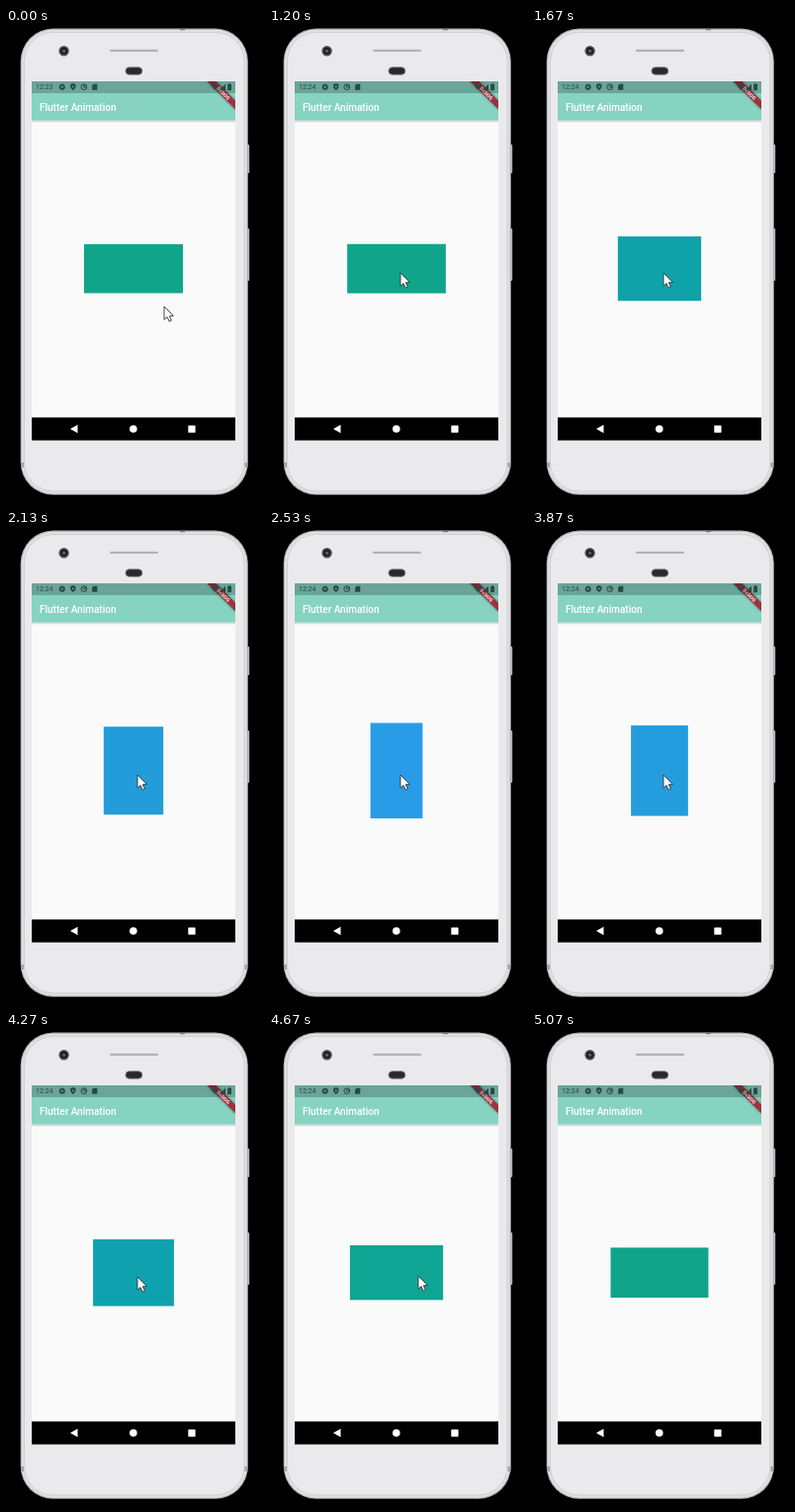
Recreate the animation shown at these times as an HTML page with a canvas. Size 260x480 px, loop 5140 ms.

```html
<!DOCTYPE html>
<html lang="en">
<head>
<meta charset="utf-8">
<title>Flutter Animation</title>
<style>
  html, body { margin: 0; width: 100%; height: 100%; overflow: hidden; background: #000; }
  canvas { display: block; width: 260px; height: 480px; }
</style>
</head>
<body>
<canvas id="stage" width="260" height="480"></canvas>
<script>
const ctx = document.getElementById('stage').getContext('2d');
const LOOP = 5140, STEP = 1000 / 15, DURATION = 2000;
const GREEN = [16, 165, 137], TEAL = [15, 162, 174], BLUE = [43, 155, 237];
const TEAL_AT = 0.36;
const INK = '#2c4842';

const clamp = v => Math.min(1, Math.max(0, v));
const mix = (a, b, p) => a + (b - a) * p;

// cubic-bezier(0.4, 0, 0.2, 1)
function fastOutSlowIn(t) {
  if (t <= 0 || t >= 1) return clamp(t);
  let lo = 0, hi = 1, s;
  for (let i = 0; i < 24; i++) {
    s = (lo + hi) / 2;
    const r = 1 - s;
    if (1.2 * s * r * r + 0.6 * s * s * r + s * s * s < t) lo = s; else hi = s;
  }
  return s * s * (3 - 2 * s);
}

function box(x, y, w, h, fill) {
  ctx.fillStyle = fill;
  ctx.fillRect(x, y, w, h);
}

function round(x, y, w, h, r, fill, stroke) {
  ctx.beginPath();
  ctx.roundRect(x, y, w, h, r);
  paint(fill, stroke);
}

function disc(x, y, r, fill, stroke) {
  ctx.beginPath();
  ctx.arc(x, y, r, 0, Math.PI * 2);
  paint(fill, stroke);
}

function poly(points, fill, stroke) {
  ctx.beginPath();
  points.forEach(([x, y]) => ctx.lineTo(x, y));
  ctx.closePath();
  paint(fill, stroke);
}

function paint(fill, stroke) {
  if (fill) { ctx.fillStyle = fill; ctx.fill(); }
  if (stroke) { ctx.strokeStyle = stroke; ctx.stroke(); }
}

function label(text, x, y, font, color, align = 'left') {
  ctx.font = font + ' Roboto, sans-serif';
  ctx.fillStyle = color;
  ctx.textAlign = align;
  ctx.fillText(text, x, y);
}

function shell(inset, fill, stroke) {
  round(14.7 + inset, 0.6 + inset, 230.1 - inset * 2, 472.2 - inset * 2, 33 - inset, fill, stroke);
}

function drawPhone() {
  box(0, 0, 260, 480, '#000');
  round(243, 118, 3.2, 29, 1, '#b9b9bd');
  round(243, 203, 3.2, 53, 1, '#b9b9bd');
  ctx.lineWidth = 1;
  shell(0, '#b4b2b6');
  shell(1.1, '#e2e0e3');
  shell(3.8, '#eaeaed', '#cfcfd3');
  box(176, 0.6, 5, 1.6, '#77777b');
  for (const x of [15, 241.5]) box(x, 440, 3, 5, '#a4a4a8');

  disc(58.6, 23.2, 5.2, '#505257');
  disc(58.6, 23.2, 3.6, '#1d1f24');
  disc(58.6, 23.2, 1.5, '#62656c');
  round(105, 21.8, 49, 2.2, 1.1, '#b3b3b7');
  round(120.9, 39.7, 17, 7.6, 3.8, '#29292c', '#8e8e92');
}

function drawStatusIcons() {
  ctx.lineWidth = 1.5;
  for (let i = 0; i < 8; i++) {
    const a = i * Math.PI / 4;
    const dx = Math.cos(a), dy = Math.sin(a);
    ctx.beginPath();
    ctx.moveTo(56.8 + dx * 2, 59.7 + dy * 2);
    ctx.lineTo(56.8 + dx * 3.2, 59.7 + dy * 3.2);
    paint(null, INK);
  }
  disc(56.8, 59.7, 1.8, null, INK);
  poly([[67.8, 56.1], [70.6, 57.3], [70.3, 60.5], [67.8, 63.3], [65.3, 60.5], [65, 57.3]], INK);
  disc(67.8, 59.4, 0.9, '#69a497');
  ctx.lineWidth = 1;
  disc(78.8, 59.7, 2.9, null, INK);
  disc(79.5, 59.1, 1.3, null, INK);
  poly([[88.6, 56.7], [92.3, 56.7], [92.3, 62.7], [87.1, 62.7], [87.1, 58.2]], INK);

  poly([[207, 57.5], [215, 57.5], [211, 62.8]], INK);
  poly([[222, 56.8], [222, 63], [216, 63]], INK);
  box(224.2, 57, 3.8, 6.1, INK);
  box(225.2, 56.2, 1.8, 1, INK);
}

function drawBanner() {
  ctx.save();
  ctx.beginPath();
  ctx.rect(26, 54, 206, 340);
  ctx.clip();
  ctx.translate(232, 54);
  ctx.rotate(Math.PI / 4);
  ctx.shadowColor = 'rgba(0,0,0,.5)';
  ctx.shadowBlur = 3;
  box(-20, 14, 40, 6, '#a2303f');
  ctx.shadowBlur = 0;
  label('DEBUG', 0, 18.9, '900 5.1px', '#f4e4e4', 'center');
  ctx.restore();
}

function drawScreen(clock) {
  box(26, 54, 206, 363.6, '#fafafa');
  const shade = ctx.createLinearGradient(0, 93.6, 0, 96);
  shade.addColorStop(0, 'rgba(0,0,0,.2)');
  shade.addColorStop(1, 'rgba(0,0,0,0)');
  box(26, 93.6, 206, 2.4, shade);
  box(26, 54, 206, 39.6, '#86d3c2');
  drawBanner();

  // The system bar lies over the app, banner included
  box(26, 54, 206, 12, 'rgba(0,0,0,.22)');
  label(clock, 30, 62.3, '7px', INK);
  drawStatusIcons();
  label('Flutter Animation', 34, 83.8, '500 10px', '#fff');

  box(26, 394.4, 206, 23.2, '#000');
  poly([[65, 406], [72.5, 401.8], [72.5, 410.2]], '#fff');
  disc(128.8, 406, 3.8, '#fff');
  round(184.3, 402.4, 7.3, 7.3, 0.6, '#fff');
}

function tileColor(p) {
  const [from, to, q] = p < TEAL_AT
    ? [GREEN, TEAL, p / TEAL_AT]
    : [TEAL, BLUE, (p - TEAL_AT) / (1 - TEAL_AT)];
  return `rgb(${from.map((c, i) => Math.round(mix(c, to[i], q)))})`;
}

function drawTile(t) {
  const p = fastOutSlowIn((t - 1106) / DURATION) - fastOutSlowIn((t - 3443) / DURATION);
  const w = mix(100, 50, p), h = mix(49.6, 99.4, p);
  box(129 - w / 2, 243.7 - h / 2, w, h, tileColor(p));
}

function cursorAt(t) {
  if (t > 4790) return null;
  if (t > 4720) return [214, 243];
  if (t > 4650) return [151, 247];
  const left = 1 - clamp(t / 467);
  const p = 1 - left * left;
  return [mix(160, 133, p), mix(282, 248, p)];
}

function drawCursor(t) {
  const at = cursorAt(t);
  if (!at) return;
  ctx.save();
  ctx.translate(at[0], at[1]);
  ctx.lineWidth = 0.9;
  ctx.lineJoin = 'round';
  poly([[0, 0], [0, 13.3], [3, 10.6], [5.2, 15.2], [7.4, 14.2], [5.3, 9.8], [9.4, 9.5]], '#fff', '#303236');
  ctx.restore();
}

function frame() {
  const now = performance.now() % LOOP;
  const t = Math.min(76, Math.floor((now + 5) / STEP)) * STEP;
  drawPhone();
  drawScreen(t < 260 ? '12:23' : '12:24');
  drawTile(t);
  drawCursor(t);
  requestAnimationFrame(frame);
}
frame();
</script>
</body>
</html>
```
